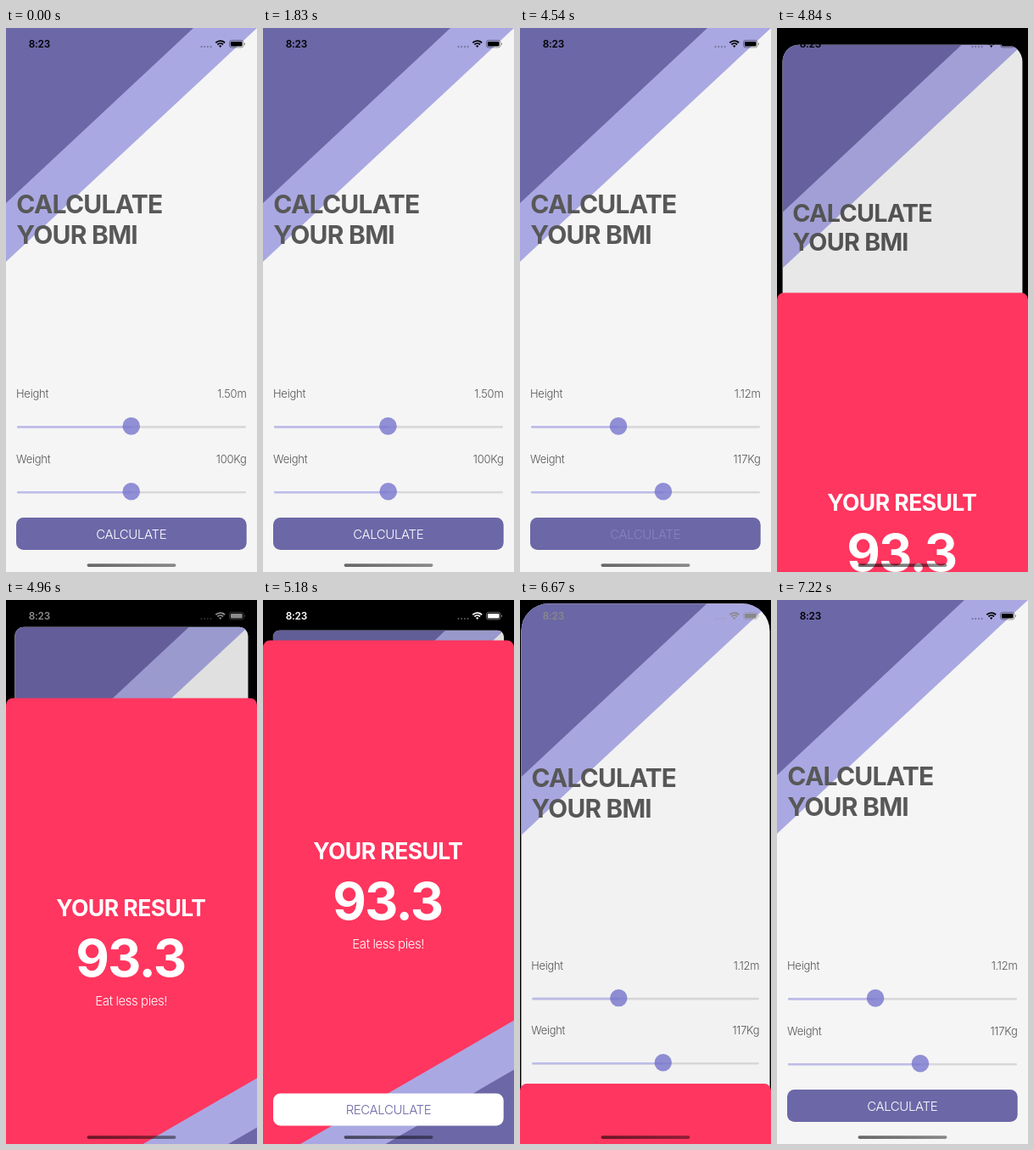
These frames come from a looping animation (296x640 px, 7.24 s). An HTML page:

```html
<!DOCTYPE html>
<html lang="en">
<head>
<meta charset="utf-8">
<title>BMI calculator</title>
<style>
  html, body { margin: 0; width: 100%; height: 100%; overflow: hidden; background: #000; }
  #stage { position: relative; width: 100%; height: 100%; overflow: hidden; contain: strict; }
  #card, #sheet, #status { position: absolute; left: 0; top: 0; width: 296px; height: 640px; overflow: hidden; }
  svg { display: block; font-family: Inter, "Open Sans", sans-serif; }
  #card { background: #f5f5f5; transform-origin: 50% 0; }
  #sheet { background: #ff365f; border-radius: 8px 8px 0 0; }
  .light { fill: #aaa8e2; }
  .dark { fill: #6c67a7; }
  .title { font-weight: 700; font-size: 30px; letter-spacing: -.75px; fill: #585858; }
  .label { font-weight: 300; font-size: 13px; letter-spacing: -.25px; fill: #555; }
  .button { font-weight: 300; font-size: 15px; letter-spacing: -.4px; }
  .mid { text-anchor: middle; }
  .end { text-anchor: end; }
</style>
</head>
<body>
<div id="stage">
  <div id="card">
    <svg width="296" height="640">
      <path class="light" d="M0 0H296L0 275Z"/>
      <path class="dark" d="M0 0H221L0 206Z"/>
      <g class="title"><text x="12.3" y="218">CALCULATE</text><text x="12.3" y="254">YOUR BMI</text></g>
      <g id="sliders"></g>
      <rect class="dark" x="12" y="576" width="271.7" height="38" rx="8.5"/>
      <text id="calc" class="button mid" x="147.7" y="600.5">CALCULATE</text>
      <rect id="dim" width="296" height="640"/>
    </svg>
  </div>
  <div id="sheet">
    <svg width="296" height="640">
      <path class="light" d="M296 447V640H-38.3Z"/>
      <path class="dark" d="M296 505V640H62.2Z"/>
      <g class="mid" fill="#fff">
        <text x="147.4" y="257" font-size="26.5" font-weight="700" letter-spacing="-.55">YOUR RESULT</text>
        <text x="146.8" y="328" font-size="61" font-weight="700" letter-spacing="-1.7">93.3</text>
        <text x="147.7" y="362" font-size="15" font-weight="300" letter-spacing="-.45">Eat less pies!</text>
        <rect x="12" y="533" width="271.7" height="38" rx="8.5"/>
      </g>
      <text id="recalc" class="button mid" x="148" y="557.5">RECALCULATE</text>
    </svg>
  </div>
  <svg id="status" fill="currentColor">
    <linearGradient id="fade"><stop stop-opacity=".58"/><stop offset="1" stop-opacity=".44"/></linearGradient>
    <text x="26.7" y="23" font-size="11.8" font-weight="600" letter-spacing="-.2">8:23</text>
    <path d="M230.5 22h12" stroke="currentColor" stroke-width="2" stroke-linecap="round" stroke-dasharray="0 3.7" opacity=".35"/>
    <g fill="none" stroke="currentColor" stroke-width="1.8">
      <path d="M247.3 17.4a7.6 7.6 0 0 1 10.8 0M249.4 19.5a4.7 4.7 0 0 1 6.6 0"/>
      <rect x="263.5" y="14.5" width="16.5" height="8.4" rx="2.5" stroke-width="1" opacity=".4"/>
    </g>
    <path d="M252.7 22.9l-1.7-1.8a2.4 2.4 0 0 1 3.4 0z"/>
    <rect x="264.9" y="15.9" width="13.7" height="5.6" rx="1.3"/>
    <path d="M281 17.2q2 1.5 0 3z" opacity=".5"/>
    <rect x="95.5" y="630.3" width="105" height="3.6" rx="1.8" fill="url(#fade)"/>
  </svg>
</div>
<script>
const LOOP = 7240;
// The screen only refreshes at these moments.
const ticks = [0, 1830, 1940, 2050, 2170, 3330, 3440, 4540, 4840, 4960, 5080, 5180,
  6360, 6500, 6670, 6780, 6890, 7000];

const $ = id => document.getElementById(id);
const ramp = (t, a, b) => Math.min(1, Math.max(0, (t - a) / (b - a)));
const smooth = u => u * u * (3 - 2 * u);
const spring = (t, start, rate) => {
  const x = Math.max(0, t - start) / 1000 * rate;
  return 1 - (1 + x) * Math.exp(-x);
};

function makeSlider(name, y) {
  $('sliders').insertAdjacentHTML('beforeend', `
    <text class="label" x="12" y="${y - 33.2}">${name}</text>
    <text class="label end" x="283.5" y="${y - 33.2}"></text>
    <rect x="13" y="${y - .3}" width="270" height="2.6" rx="1.3" fill="#d9d9db"/>
    <rect x="13" y="${y - .3}" height="2.6" rx="1.3" fill="#bfbdea"/>
    <circle cy="${y}" r="10.3" fill="#7472cc" fill-opacity=".78"/>`);
  const [value, , bar, knob] = [...$('sliders').children].slice(-4);
  return (share, text) => {
    const x = 22.7 + 250 * share;
    value.textContent = text;
    bar.setAttribute('width', x - 13);
    knob.setAttribute('cx', x);
  };
}
const setHeight = makeSlider('Height', 468.4);
const setWeight = makeSlider('Weight', 545.2);

function draw(t) {
  const height = 1.5 - .38 * smooth(ramp(t, 1810, 2170));
  const weight = t < 4540 ? 100 + 16 * ramp(t, 3275, 3440) : 117;
  setHeight(height / 3, height.toFixed(2) + 'm');
  setWeight(weight / 200, Math.round(weight) + 'Kg');

  const open = t < 7000 ? spring(t, 4717, 15) - spring(t, 6454, 17) : 0;
  $('card').style.transform = `translateY(${36 * open}px) scale(${1 - .081 * open})`;
  $('card').style.borderRadius = (open ? 36 - 28 * open : 0) + 'px';
  $('dim').setAttribute('opacity', .1 * open);
  $('sheet').style.transform = `translateY(${640 - 597 * open}px)`;

  const white = ramp(t, 4850, 5050) - ramp(t, 6530, 6830);
  const grey = Math.round(255 * white);
  $('status').style.color = `rgb(${grey},${grey},${grey})`;
  $('calc').setAttribute('fill', t >= 4540 && t < 6000 ? '#8884bf' : '#fff');
  $('recalc').setAttribute('fill', t >= 6360 ? '#e2e1f5' : '#6c67a7');
}

function frame() {
  const now = performance.now() % LOOP;
  draw(ticks.findLast(tick => tick <= now));
  requestAnimationFrame(frame);
}
frame();
</script>
</body>
</html>
```
